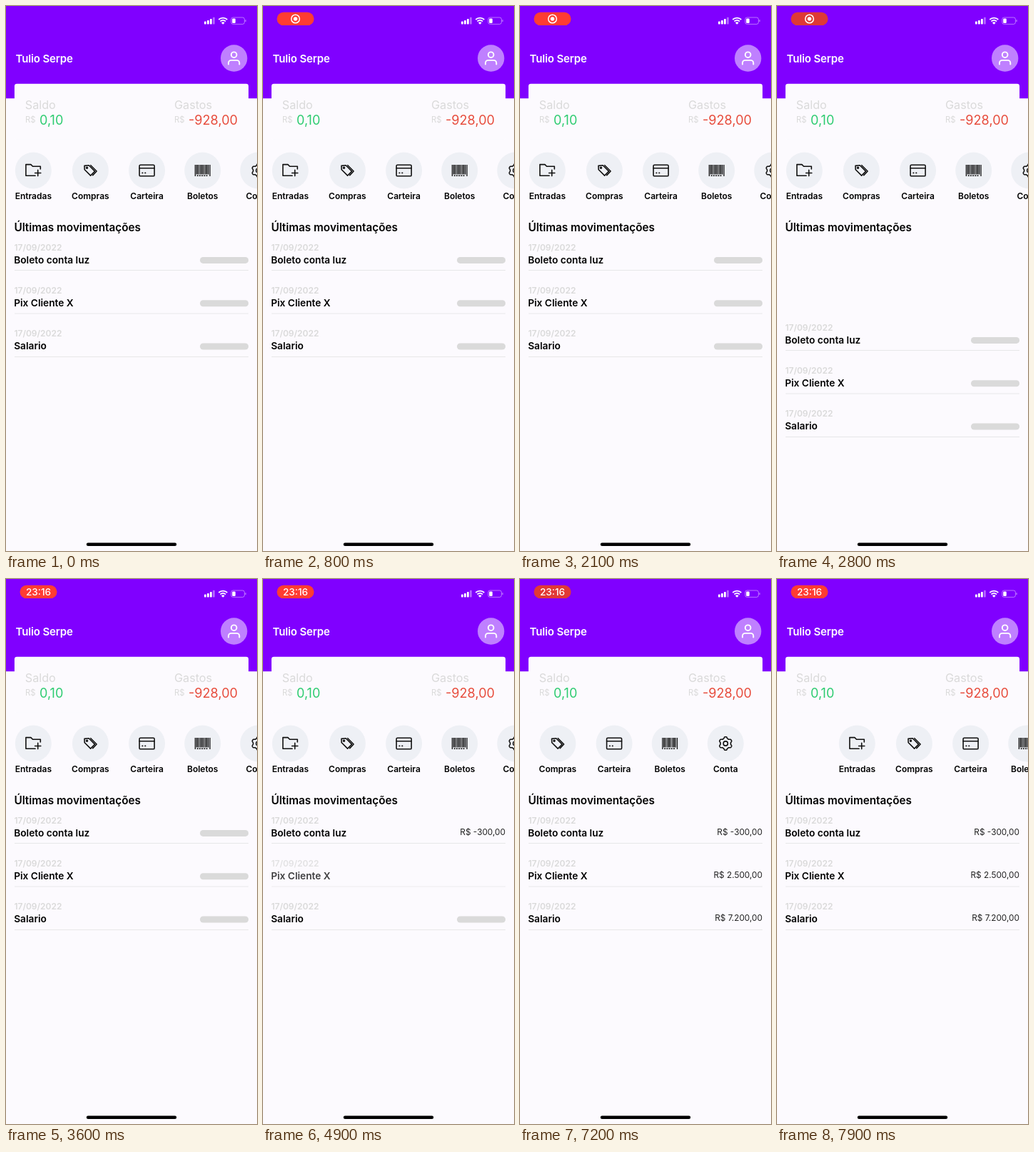
Write an HTML page that moves like this. It is 352x762 px and loops after 8000 ms.

```html
<!DOCTYPE html>
<html lang="pt-BR">
<head>
<meta charset="utf-8">
<title>Movimentações</title>
<style>
  html, body { margin: 0; width: 100%; height: 100%; overflow: hidden; background: #fcfafe; }
  svg { display: block; width: 352px; height: 762px; font-family: Inter, "Liberation Sans", sans-serif; }
  .name { font-size: 15px; font-weight: 600; letter-spacing: -.13px; fill: #fff; }
  .caption { font-size: 16.2px; fill: #dadada; }
  .unit { font-size: 11.3px; fill: #dadada; }
  .sum { font-size: 18.1px; }
  .label { font-size: 12px; font-weight: 600; text-anchor: middle; }
  .head { font-size: 15.3px; font-weight: 600; }
  .date { font-size: 12px; font-weight: 600; fill: #dadada; }
  .title { font-size: 13.7px; font-weight: 600; }
  .value { font-size: 11.8px; fill: #222; text-anchor: end; }
  .clock { font-size: 13.6px; font-weight: 500; fill: #fff; text-anchor: middle; }
  .icon { fill: none; stroke: #111; stroke-width: 1.6; stroke-linejoin: round; stroke-linecap: round; }
</style>
</head>
<body>
<svg viewBox="0 0 352 762">
  <defs><clipPath id="listClip"><rect x="11" y="330" width="329.2" height="432"/></clipPath></defs>
  <rect width="352" height="762" fill="#fcfafe"/>
  <rect width="352" height="129.2" fill="#8000ff"/>

  <g id="pill">
    <rect id="pillBg" x="19.5" y="8.7" width="52" height="18.4" rx="9.2"/>
    <g id="rec" fill="none" stroke="#fff" stroke-width="1.5">
      <circle cx="45.5" cy="18" r="5.8"/><circle cx="45.5" cy="18" r="2.8" fill="#fff" stroke="none"/>
    </g>
    <text id="clock" class="clock" x="45.5" y="22.9">23:16</text>
  </g>

  <g fill="#fff">
    <rect x="278" y="21.5" width="2.8" height="4" rx=".7"/>
    <rect x="282" y="20" width="2.8" height="5.5" rx=".7"/>
    <rect x="286" y="18" width="2.8" height="7.5" rx=".7"/>
    <rect x="290" y="15.8" width="2.8" height="9.7" rx=".7" opacity=".4"/>
    <path d="M302 23.4a3.2 3.2 0 0 1 4.6 0l-2.3 2.4z"/>
  </g>
  <g fill="none" stroke="#fff" stroke-width="1.8">
    <path d="M300.6 21.5a5.3 5.3 0 0 1 7.4 0M298.3 19a8.6 8.6 0 0 1 12 0"/>
    <rect x="315.8" y="16" width="18.6" height="9.4" rx="2.6" stroke-width="1" opacity=".45"/>
    <path d="M336 19.3v2.8" stroke-width="1.2" opacity=".5"/>
  </g>
  <rect x="317.2" y="17.4" width="4.6" height="6.6" rx="1.3" fill="#fff"/>

  <text class="name" x="13.5" y="78.5">Tulio Serpe</text>
  <circle cx="319.7" cy="73" r="18.7" fill="#bf80ff"/>
  <g transform="translate(308.2 61.5) scale(.956)" fill="none" stroke="#fff" stroke-width="2" stroke-linecap="round" stroke-linejoin="round">
    <path d="M20 21v-2a4 4 0 0 0-4-4H8a4 4 0 0 0-4 4v2"/><circle cx="12" cy="7" r="4"/>
  </g>

  <rect x="11.9" y="108.7" width="328.2" height="78" rx="3.4" fill="#fcfafe"/>
  <text class="caption" x="26.8" y="144.3">Saldo</text>
  <text class="unit" x="27" y="163.4">R$</text>
  <text class="sum" x="47" y="166" fill="#2ecc71">0,10</text>
  <text class="caption" x="236" y="144.3">Gastos</text>
  <text class="unit" x="236" y="163.4">R$</text>
  <text class="sum" x="325" y="166" fill="#e74c3c" text-anchor="end">-928,00</text>

  <g id="menu"></g>
  <text class="head" x="11.4" y="315">Últimas movimentações</text>
  <g clip-path="url(#listClip)"><g id="list"></g></g>
  <rect x="112.8" y="750.6" width="126.4" height="4.5" rx="2.25"/>
</svg>

<script>
const $ = id => document.getElementById(id);
const LOOP = 8000, STEP = 100;
const clamp = (x, a = 0, b = 1) => Math.min(b, Math.max(a, x));
const ramp = (t, start, length) => clamp((t - start) / length);
const inOut = x => x < .5 ? 2 * x * x : 1 - 2 * (1 - x) ** 2;

// Smooth curve through [time, value] points that never overshoots them
function curve(points) {
  const slope = i => (points[i + 1][1] - points[i][1]) / (points[i + 1][0] - points[i][0]);
  const tangent = points.map((_, i) => {
    if (i === 0 || i === points.length - 1) return 0;
    const a = slope(i - 1), b = slope(i);
    return a * b <= 0 ? 0 : 2 * a * b / (a + b);
  });
  return t => {
    if (t <= points[0][0]) return points[0][1];
    const i = points.findIndex(p => p[0] >= t) - 1;
    if (i < 0) return points[points.length - 1][1];
    const [t0, v0] = points[i], [t1, v1] = points[i + 1];
    const h = t1 - t0, s = (t - t0) / h, r = 1 - s;
    return r * r * (1 + 2 * s) * v0 + s * s * (3 - 2 * s) * v1
      + h * s * r * (r * tangent[i] - s * tangent[i + 1]);
  };
}

const listY = curve([[950, 0], [1150, -32], [1400, -58], [1550, -60], [1750, -38], [1950, -8],
  [2100, 0], [2200, 6], [2400, 50], [2600, 91], [2700, 103], [2800, 112], [2900, 104],
  [3050, 65], [3250, 18], [3400, 4], [3550, 0]]);
const menuX = curve([[6200, 0], [6300, -12], [6400, -36], [6500, -60], [6700, -95], [6820, -103],
  [6950, -90], [7080, -71], [7200, -65.5], [7500, -65.5], [7600, -44], [7700, 2], [7800, 48], [7900, 74]]);

// Icons are drawn around their own centre
function gear() {
  let d = "";
  for (let i = 0; i < 96; i++) {
    const a = i / 96 * Math.PI * 2;
    const r = 8.2 - clamp(1.6 * Math.cos(6 * a), -1, 1);
    d += (i ? "L" : "M") + (r * Math.cos(a)).toFixed(2) + " " + (r * Math.sin(a)).toFixed(2);
  }
  return `<path d="${d}Z"/><circle r="3.1"/>`;
}
function stripes() {
  let out = "";
  for (let i = 0; i < 10; i++) {
    const long = i % 9 === 0;
    out += `<path d="M${-10.3 + i * 2.29} -8V${long ? 8 : 5.4}" stroke-width="${i % 3 === 1 ? 1.9 : 1.3}" stroke-linecap="butt"/>`;
  }
  return out + `<path d="M-8 7.3H8" stroke-width="1.4" stroke-dasharray="2 1.2" stroke-linecap="butt"/>`;
}
const icons = {
  folder: `<path d="M10 -2V-5.8H-.8L-3.4 -8.4H-10.4V7.2H2.8M6.4 -.6V7.6M2.3 3.5H10.5"/>`,
  tags: `<path d="M-8.4 -6.6L-2.2 -7.3L6.2 1.1L.2 7.1L-8.2 -1.3Z"/><path d="M.4 -7.3L8.7 1L3.3 6.6"/><circle cx="-4.9" cy="-3.8" r="1"/>`,
  card: `<rect x="-10.5" y="-7.8" width="21" height="15.6" rx="1.4"/><path d="M-10.5 -3.2H10.5M-6.5 3.4h.6M-2.6 3.4h.6"/>`,
  bars: stripes(),
  gear: gear()
};

$("menu").innerHTML = [
  ["Entradas", 38.3, "folder"], ["Compras", 118.4, "tags"], ["Carteira", 197.6, "card"],
  ["Boletos", 275.7, "bars"], ["Conta", 353.8, "gear"]
].map(([label, x, icon]) => `<g transform="translate(${x} 230)">
  <circle r="25.5" fill="#eef0f5"/><g class="icon">${icons[icon]}</g>
  <text class="label" y="40.4">${label}</text></g>`).join("");

const rows = [
  { title: "Boleto conta luz", value: "R$ -300,00", tap: 4000 },
  { title: "Pix Cliente X", value: "R$ 2.500,00", tap: 4650 },
  { title: "Salario", value: "R$ 7.200,00", tap: 5350 }
];
$("list").innerHTML = rows.map((row, i) => `<g transform="translate(0 ${i * 60.3})">
  <text class="date" x="11.4" y="341.9">17/09/2022</text>
  <text class="title" x="11.2" y="359.5">${row.title}</text>
  <rect class="mask" x="272" y="350.9" width="68.1" height="9" rx="4.4" fill="#dadada"/>
  <text class="value" x="340" y="357.8">${row.value}</text>
  <rect x="12" y="369.4" width="328.1" height=".6" fill="#dadada"/></g>`).join("");
rows.forEach((row, i) => {
  row.el = $("list").children[i];
  row.mask = row.el.querySelector(".mask");
  row.text = row.el.querySelector(".value");
});

function drawRow(row, t) {
  const release = row.tap + 100;
  const pressed = t >= row.tap && t < release + 250;
  row.el.setAttribute("opacity", pressed ? .2 + .8 * inOut(ramp(t, release, 250)) : 1);
  const shown = t >= release;
  row.mask.setAttribute("opacity", shown ? 0 : 1);
  row.text.setAttribute("opacity", shown ? 1 : 0);
  row.text.setAttribute("x", 340 + 100 * (1 - inOut(ramp(t, release, 500))));
}

function drawPill(t) {
  const glow = clamp(1.45 * (.5 - .5 * Math.cos((t - 1400) / 1420 * Math.PI * 2)));
  $("pillBg").setAttribute("fill", `rgb(${222 + 33 * glow},${57 + 3 * glow},${54 - 4 * glow})`);
  $("pill").setAttribute("opacity", inOut(ramp(t, 300, 400)));
  const swap = ramp(t, 3100, 250);
  $("rec").setAttribute("opacity", 1 - swap);
  $("clock").setAttribute("opacity", swap);
}

function draw(t) {
  drawPill(t);
  $("list").setAttribute("transform", `translate(0 ${listY(t)})`);
  $("menu").setAttribute("transform", `translate(${menuX(t)} 0)`);
  rows.forEach(row => drawRow(row, t));
}

let begin;
function tick(now) {
  begin ??= now;
  const t = (now - begin + 4) % LOOP;
  draw(Math.floor(t / STEP) * STEP);
  requestAnimationFrame(tick);
}
draw(0);
requestAnimationFrame(tick);
</script>
</body>
</html>
```
